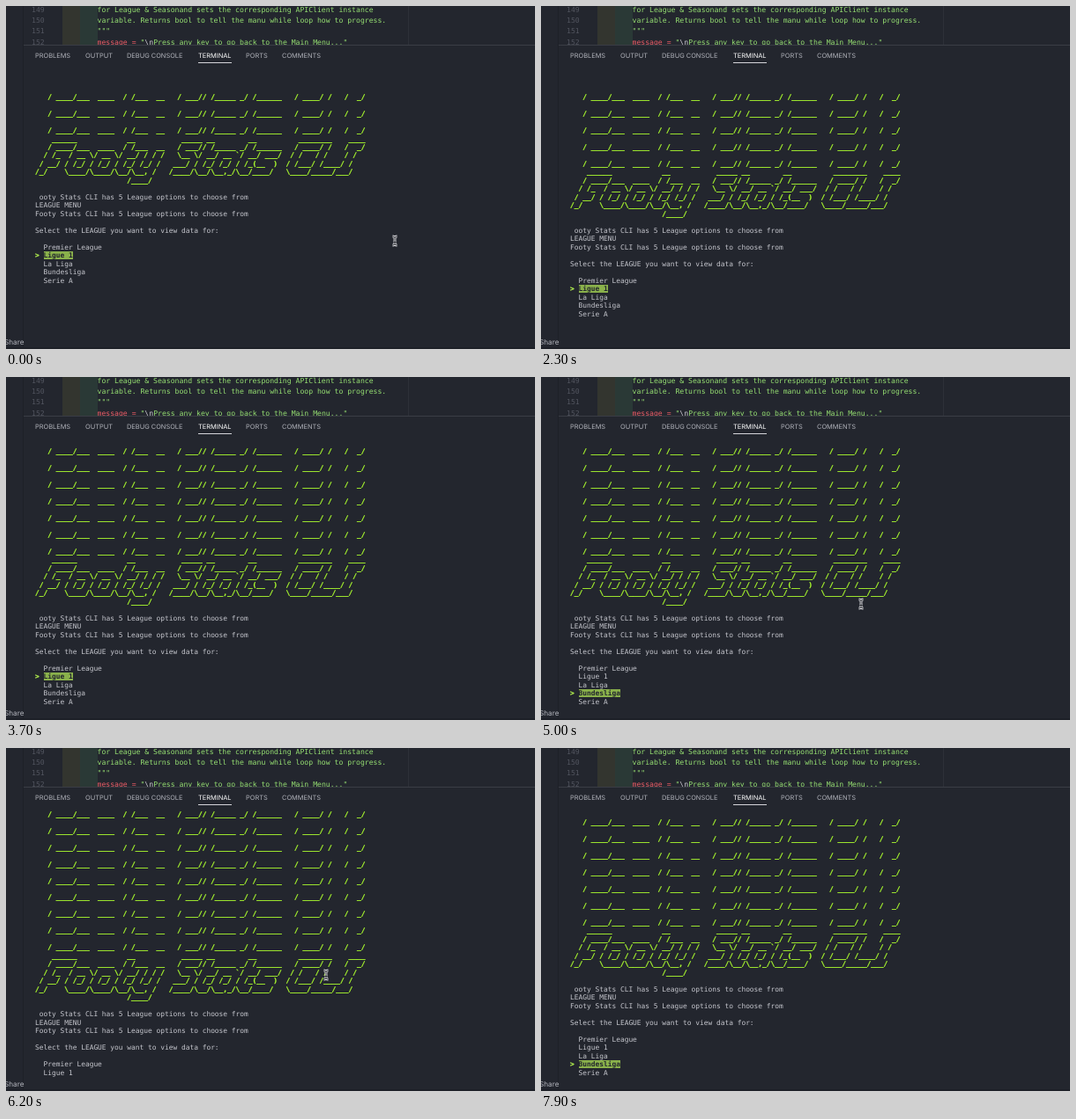
Write an HTML page that moves like this. It is 600 px wide and 390 px high and loops after 8000 ms.

```html
<!DOCTYPE html>
<html lang="en">
<head>
<meta charset="utf-8">
<title>League menu in a terminal</title>
<style>
  html, body { margin: 0; width: 100%; height: 100%; overflow: hidden; background: #23262e; }
  #stage { position: relative; width: 600px; height: 390px; overflow: hidden; text-rendering: geometricPrecision; }
  #stage > * { position: absolute; margin: 0; }
  pre { font-family: "DejaVu Sans Mono", monospace; white-space: pre; }
  #editor { left: 0; top: 0; width: 600px; height: 44px; overflow: hidden; }
  #editor > * { position: absolute; margin: 0; }
  .tint { top: 0; width: 20px; height: 44px; }
  .ruler { left: 456px; top: 0; width: 1px; height: 44px; background: #2d3038; }
  #numbers, #code { top: -2px; font-size: 8.14px; line-height: 12.2px; }
  #numbers { left: 29px; color: #52555f; }
  #code { left: 103.5px; color: #96e072; }
  #code b { font-weight: normal; color: #ee5d66; }
  #code i { font-style: normal; color: #d0cdd6; }
  .side { left: 19px; top: 0; width: 1px; height: 388px; background: #1d2027; }
  .split { left: 20px; top: 44px; width: 580px; height: 1px; background: #3a3d45; }
  .foot { left: 0; top: 388px; width: 600px; height: 2px; background: #1d2027; }
  .tab, .share { font: 7.42px/10px Inter, sans-serif; color: #b0b2ba; white-space: nowrap; }
  .tab { top: 52px; }
  .on { color: #fff; }
  .line { left: 218px; top: 64px; width: 38px; height: 1px; background: #d5d5da; }
  .share { left: -2px; top: 377px; font-size: 8.2px; }
  #term { left: 33px; top: 70.65px; width: 560px; height: 305px; overflow: hidden;
    font-size: 7.88px; line-height: 9.48px; color: #c6c7ce; }
  #term .art { color: #adff2f; font-weight: bold; -webkit-text-stroke: .25px; }
  #term .mark { color: #b2f04e; font-weight: bold; -webkit-text-stroke: .25px; }
  #term .pick { background: #8ab14b; color: #23262e; font-weight: bold; }
</style>
</head>
<body>
<div id="stage">
  <div id="editor">
    <div class="tint" style="left:64px;background:#33352f"></div>
    <div class="tint" style="left:84px;background:#2a3936"></div>
    <div class="ruler"></div>
    <pre id="numbers">149
150
151
152</pre>
    <pre id="code">for League &amp; Seasonand sets the corresponding APIClient instance
variable. Returns bool to tell the manu while loop how to progress.
"""
<b>message</b> <b>=</b> "<i>\n</i>Press any key to go back to the Main Menu..."</pre>
  </div>
  <div class="side"></div>
  <div class="split"></div>
  <div class="tab" style="left:33px">PROBLEMS</div>
  <div class="tab" style="left:90px">OUTPUT</div>
  <div class="tab" style="left:137px">DEBUG CONSOLE</div>
  <div class="tab on" style="left:218px">TERMINAL</div>
  <div class="tab" style="left:272px">PORTS</div>
  <div class="tab" style="left:313px">COMMENTS</div>
  <div class="line"></div>
  <pre id="term"></pre>
  <div class="share">Share</div>
  <div class="foot"></div>
  <svg id="mouse" width="10" height="16" viewBox="-5 -8 10 16" fill="none">
    <defs><path id="beam" d="M-2.5-5Q0-5 0-3.5Q0-5 2.5-5M0-3.5V3.5M-2.5 5Q0 5 0 3.5Q0 5 2.5 5M-1.5 1.5H1.5"/></defs>
    <use href="#beam" stroke="#e6e6ea" stroke-width="2.8"/>
    <use href="#beam" stroke="#14161b" stroke-width=".9"/>
  </svg>
</div>
<script>
const LOOP = 8000, ROWS = 32;
const art = [
  '    ______            __           _____ __        __          ________    ____',
  '   / ____/___  ____  / /___  __   / ___// /_____ _/ /______   / ____/ /   /  _/',
  '  / /_  / __ \\/ __ \\/ __/ / / /   \\__ \\/ __/ __ `/ __/ ___/  / /   / /    / /',
  ' / __/ / /_/ / /_/ / /_/ /_/ /   ___/ / /_/ /_/ / /_(__  )  / /___/ /____/ /',
  '/_/    \\____/\\____/\\__/\\__, /   /____/\\__/\\__,_/\\__/____/   \\____/_____/___/',
  '                      /____/'
];
const leagues = ['Premier League', 'Ligue 1', 'La Liga', 'Bundesliga', 'Serie A'];
const title = 'ooty Stats CLI has 5 League options to choose from';

// Each key press: [time, selected league]; every redraw leaves one stray art row.
const presses = [[0, 1], [1500, 2], [2000, 1], [2900, 2], [3400, 1], [3900, 2], [4300, 3]];
// Pointer visits: [from, to, x, y]
const visits = [[0, 1000, 441, 267], [5000, 7400, 363, 258]];

const term = document.getElementById('term');
const mouse = document.getElementById('mouse');
const span = (name, text) => `<span class="${name}">${text}</span>`;

function buffer(strays, selected) {
  const lines = ['', '', ''];
  for (let i = 0; i < strays; i++) {
    if (i) lines.push('');
    lines.push(span('art', art[1]));
  }
  lines.push(...art.map(row => span('art', row)), '', ' ' + title,
    'LEAGUE MENU', 'F' + title, '', 'Select the LEAGUE you want to view data for:', '');
  leagues.forEach((name, i) => lines.push(i === selected
    ? span('mark', '&gt;') + ' ' + span('pick', name)
    : '  ' + name));
  return lines;
}

let shown = '';
function draw(t) {
  const count = presses.filter(p => p[0] <= t).length;
  const back = t >= 5600 && t < 6500 ? 3 : 0; // rows scrolled back by the wheel
  const key = count + ':' + back;
  if (key !== shown) {
    shown = key;
    const lines = buffer(count + 2, presses[count - 1][1]);
    const top = Math.max(0, lines.length - ROWS - back);
    term.innerHTML = lines.slice(top, top + ROWS).join('\n');
  }
  const visit = visits.find(v => t >= v[0] && t < v[1]);
  mouse.style.display = visit ? 'block' : 'none';
  if (visit) {
    mouse.style.left = visit[2] - 5 + 'px';
    mouse.style.top = visit[3] - 8 + 'px';
  }
}

function tick() {
  draw(performance.now() % LOOP);
  requestAnimationFrame(tick);
}
tick();
</script>
</body>
</html>
```
